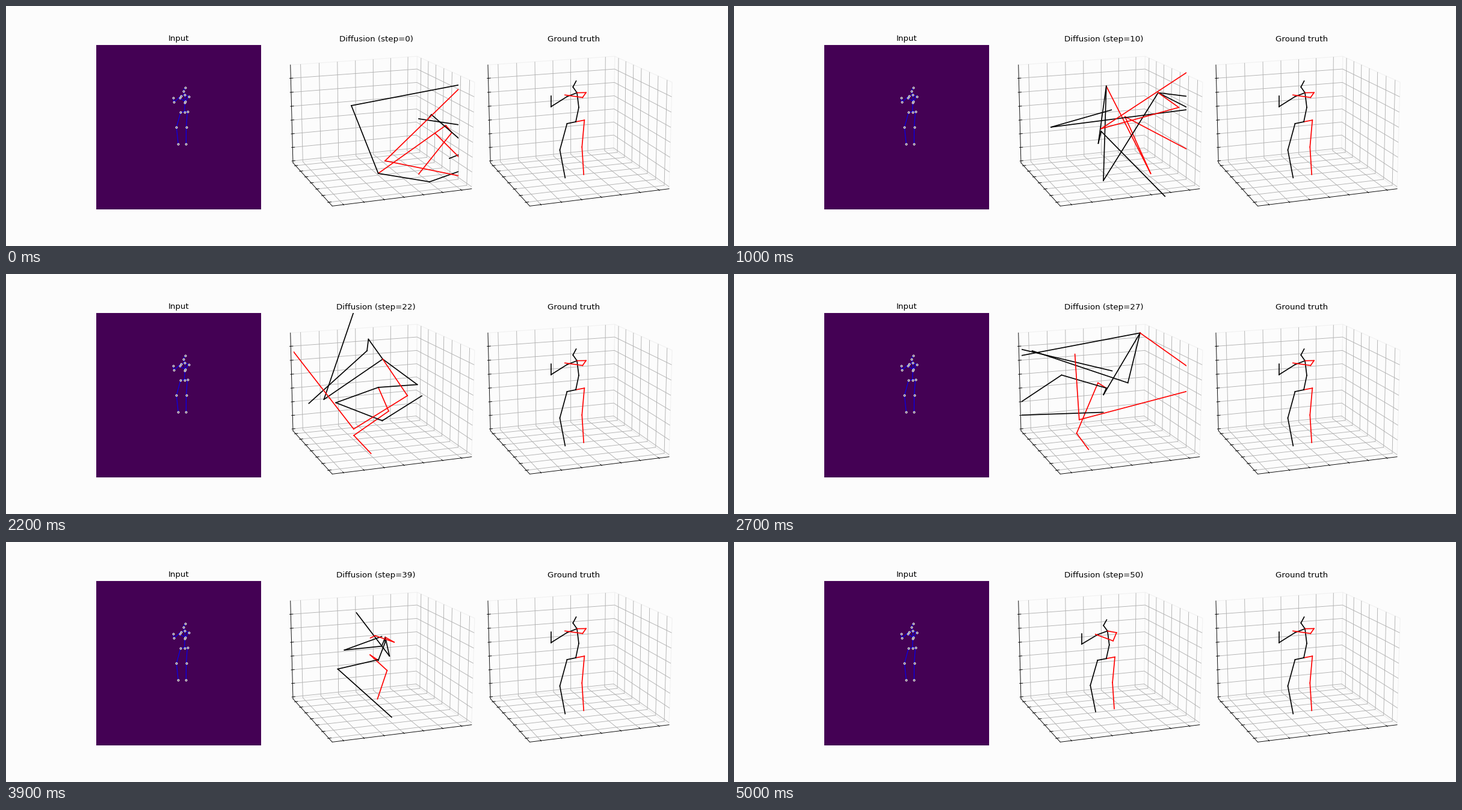
These frames come from a looping animation (1200x400 px, 7000 ms). A matplotlib script:

```python
import numpy as np
import matplotlib.pyplot as plt
from matplotlib.animation import FuncAnimation
from matplotlib.collections import LineCollection
from matplotlib.patches import Polygon, Rectangle

STEPS, FRAMES, INTERVAL = 50, 70, 100
SIDE = 0.775 * 1200 / 3.4            # width of one square panel
SHIFT = 1.2 * SIDE                   # distance between panels
LEFTS = [150 + SHIFT * k for k in range(3)]
TOP = 65.2
BG = "#fcfcfc"

# joints: pelvis, right leg, left leg, spine to head, left arm, right arm
PARENTS = [-1, 0, 1, 2, 0, 4, 5, 0, 7, 8, 9, 8, 11, 12, 8, 14, 15]
RIGHT = {1, 2, 3, 14, 15, 16}


def pose(pelvis, rleg, lleg, trunk, larm, rarm):
    return np.array([*pelvis, *rleg, *lleg, *trunk, *larm, *rarm], float).reshape(17, 2)


INPUT = pose((296.5, 176.5), (301.5, 175.5, 299.5, 202, 299.3, 229.7),
             (290.3, 176.7, 283.3, 202.3, 286.3, 230.3),
             (297.3, 161, 297.3, 147.8, 294.5, 142.3, 297.5, 136.3),
             (290.5, 150, 279.4, 160.3, 277.5, 153.4),
             (303.5, 150.5, 298.3, 159.4, 288.5, 153.4))

TRUTH = pose((947, 193), (961.3, 190.2, 957.3, 235, 960.2, 281),
             (932.5, 196, 920.5, 240, 929.3, 286.3),
             (952, 169, 949, 144.6, 942.3, 135, 947.6, 125),
             (932.5, 151, 906, 167.7, 906, 150),
             (964, 144.3, 958.3, 152.5, 929, 148.3))

START = pose((618.7, 279), (731, 199, 741, 211, 686, 280),
             (704, 293, 907, 221, 686, 188),
             (574, 166, 761, 130, 810, 225, 737, 254),
             (800, 262, 707, 181, 700, 190),
             (630, 258, 792, 291, 713, 212))


def estimate():
    """The true pose, slightly squashed, with a lower right arm."""
    p = TRUTH - [SHIFT, 0]
    p[:, 1] = 194.3 + 0.95 * (p[:, 1] - 193)
    p[14:, 1] += 3, 9, 2
    return p


def denoise():
    """Correlated noise around the estimate, fading out over the steps."""
    rng = np.random.default_rng(4)
    final, keep = estimate(), 0.85
    spread = np.tile([130.0, 80.0], (17, 1))
    spread[0] = 0, 45                # the pelvis only moves vertically
    noise = START - final
    poses = []
    for s in np.linspace(0, 1, STEPS + 1):
        poses.append(final + (1 - s**2) ** 1.7 * noise)
        fresh = spread * rng.normal(size=(17, 2))
        noise = keep * noise + np.sqrt(1 - keep**2) * fresh
    return poses


def project(points, left):
    """Perspective view of the unit box (4:4:3), azimuth 70, elevation 15."""
    p = np.asarray(points, float) * [4 / 7, 4 / 7, 3 / 7]
    az, el, dist = np.radians(70), np.radians(15), 7.5
    w = np.array([np.cos(el) * np.cos(az), np.cos(el) * np.sin(az), np.sin(el)])
    u = np.array([-np.sin(az), np.cos(az), 0])
    v = np.cross(w, u)
    depth = dist - p @ w
    scale = SIDE / 0.185
    x = left + scale * (0.095 + p @ u / depth)
    y = TOP + SIDE - scale * (0.095 + p @ v / depth)
    return np.column_stack([x, y])


def draw_box(ax, left):
    e, out, inn = 25 / 24, 1 / 60, 1 / 30
    ticks = np.arange(-3, 4) * 0.25 / 0.85
    ztick = np.arange(7) * 0.25 / 0.85 - 1
    panes = [[(e, -e, -e), (-e, -e, -e), (-e, -e, e), (e, -e, e)],
             [(-e, e, -e), (-e, -e, -e), (-e, -e, e), (-e, e, e)],
             [(e, e, -e), (-e, e, -e), (-e, -e, -e), (e, -e, -e)]]
    for pane in panes:
        ax.add_patch(Polygon(project(pane, left), fc="none", ec="#f1f1f1", lw=1))

    grid = [[(t, e, -e), (t, -e, -e), (t, -e, e)] for t in ticks]
    grid += [[(e, t, -e), (-e, t, -e), (-e, t, e)] for t in ticks]
    grid += [[(e, -e, z), (-e, -e, z), (-e, e, z)] for z in ztick]

    edges = [[(-e, e, -e), (e, e, -e)], [(e, -e, -e), (e, e, -e)],
             [(e, -e, -e), (e, -e, e)]]
    edges += [[(t, e + out, -e), (t, e - inn, -e)] for t in ticks]
    edges += [[(e + out, t, -e), (e - inn, t, -e)] for t in ticks]
    edges += [[(e + out, -e, z), (e - inn, -e, z)] for z in ztick]

    ax.add_collection(LineCollection([project(g, left) for g in grid],
                                     colors="#b0b0b0", linewidths=0.8))
    for edge in edges:
        ax.plot(*project(edge, left).T, color="black", lw=0.8)


def draw_bones(ax, joints, color=None, lw=1.5):
    bones = []
    for j, p in enumerate(PARENTS[1:], 1):
        c = color or ("red" if j in RIGHT else "black")
        bones += ax.plot(*joints[[j, p]].T, color=c, lw=lw, zorder=3)
    return bones


def add_title(ax, left, text, y=58.6):
    return ax.text(left + SIDE / 2, y, text, size=12, ha="center", va="baseline")


plt.rcParams["font.family"] = "DejaVu Sans"
fig = plt.figure(figsize=(15, 5), dpi=80, facecolor=BG)
ax = fig.add_axes([0, 0, 1, 1])
ax.axis("off")

ax.add_patch(Rectangle((150, 65), 274, 274, fc="#440154", ec="none"))
draw_bones(ax, INPUT, "blue", lw=1)
ax.scatter(*INPUT.T, s=6, color="black", edgecolors="white", linewidths=1, zorder=10)
add_title(ax, LEFTS[0], "Input", y=57.6)

draw_box(ax, LEFTS[1])
draw_box(ax, LEFTS[2])
draw_bones(ax, TRUTH)
add_title(ax, LEFTS[2], "Ground truth")

POSES = denoise()
bones = draw_bones(ax, POSES[0])
view = Rectangle((LEFTS[1], TOP), SIDE, SIDE, transform=ax.transData)
for bone in bones:
    bone.set_clip_path(view)
title = add_title(ax, LEFTS[1], "")
ax.set_xlim(0, 1200)
ax.set_ylim(400, 0)


def update(i):
    step = min(i, STEPS)
    joints = POSES[step]
    for j, bone in enumerate(bones, 1):
        bone.set_data(*joints[[j, PARENTS[j]]].T)
    title.set_text(f"Diffusion (step={step})")
    return [*bones, title]


anim = FuncAnimation(fig, update, frames=FRAMES, init_func=lambda: update(0),
                     interval=INTERVAL, repeat=True, repeat_delay=0)
plt.show()
```
